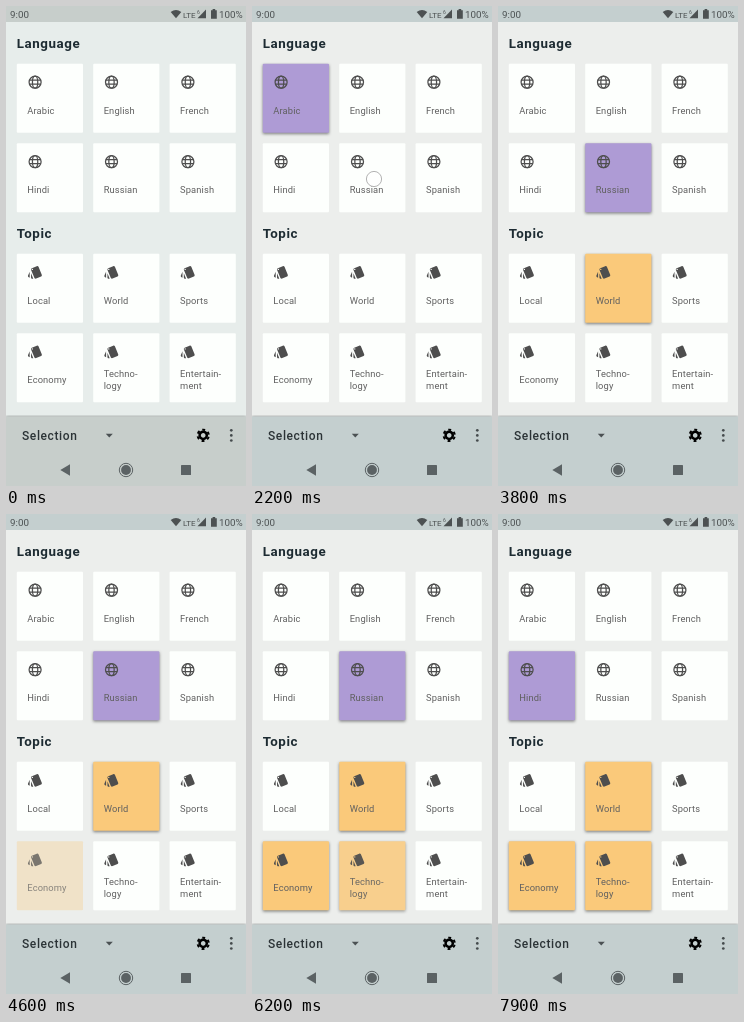
An HTML page that plays this animation: 240 by 480 pixels, repeating every 8 s.

```html
<!DOCTYPE html>
<html lang="en">
<head>
<meta charset="utf-8">
<title>Language and topic selection</title>
<style>
html, body { margin: 0; width: 100%; height: 100%; overflow: hidden; background: #eceeec; }
svg { display: block; width: 100vw; height: 100vh; }
text { font-family: Roboto, Inter, sans-serif; }
.title { font-size: 13.33px; font-weight: 700; letter-spacing: .6px; fill: #1d2b32; }
.label { font-size: 9.33px; letter-spacing: .12px; fill: #606060; }
.status { font-size: 9.8px; fill: #4c5152; }
.line { fill: none; stroke: #4e4e4e; stroke-width: 1.9; }
</style>
</head>
<body>
<svg viewBox="0 0 240 480">
  <defs>
    <filter id="blur" x="-20%" y="-20%" width="140%" height="140%"><feGaussianBlur stdDeviation="1.5"/></filter>
    <g id="globe" class="line">
      <circle r="9"/><ellipse rx="4" ry="9"/><path d="M-8.5-3H8.5M-8.5 3H8.5"/>
    </g>
    <path id="swatch" transform="translate(-12 -12)" fill="#4e4e4e" fill-rule="evenodd" d="M2.5 19.7l1.4.5v-9l-2.5 5.8c-.4 1 .1 2.2 1.1 2.7zM22 16L17.1 4c-.3-.8-1-1.2-1.8-1.2-.3 0-.6 0-.8.1L7.1 6c-.8.3-1.2 1-1.2 1.8 0 .2 0 .5.1.8l5 12c.3.7 1 1.2 1.8 1.2.3 0 .5-.1.8-.2l7.4-3c1-.5 1.4-1.6 1-2.6zM7.9 8.8a1 1 0 1 1 0-2 1 1 0 0 1 0 2zM5.9 19.8c0 1.1.9 2 2 2h1.4l-3.4-8.4z"/>
  </defs>
  <rect id="page" width="240" height="480"/>
  <text class="title" x="10.7" y="41.5">Language</text>
  <text class="title" x="10.7" y="231.5">Topic</text>
  <g id="cards"></g>

  <rect y="410.5" width="240" height="5" fill="#0006" filter="url(#blur)"/>
  <rect class="bar" width="240" height="16"/>
  <rect class="bar" y="410.5" width="240" height="69.5"/>

  <g class="status">
    <text x="4" y="12">9:00</text>
    <path d="M164.7 6Q170 1.8 175.3 6L170 12.2z"/>
    <text x="177" y="12" font-size="8" style="font-size:8px">LTE</text>
    <text x="191" y="7.5" style="font-size:5px">6</text>
    <path d="M191.5 12.2H200V3.5z"/>
    <path d="M205 4.2h1.6V3h2.6v1.2h1.6v8.6H205z"/>
    <text x="213" y="12">100%</text>
  </g>

  <text x="16" y="433.5" font-size="12" font-weight="500" letter-spacing=".6" fill="#2b3336">Selection</text>
  <path d="M99.8 427.7h7l-3.5 3.7z" fill="#4b5153"/>
  <g transform="translate(197.2 429.3) scale(.667)" fill="none" stroke="#000">
    <circle r="5.4" stroke-width="3.8"/>
    <circle r="8.4" stroke-width="3" pathLength="12" stroke-dasharray="1 1" stroke-dashoffset="-.5"/>
  </g>
  <g fill="#454b4d">
    <circle cx="225.3" cy="424.3" r="1.35"/><circle cx="225.3" cy="429.4" r="1.35"/><circle cx="225.3" cy="434.5" r="1.35"/>
  </g>
  <g fill="#5b6264">
    <path d="M54.3 464l9.7-5.8v11.6z"/>
    <circle cx="120" cy="464" r="4.9"/>
    <circle cx="120" cy="464" r="6.7" fill="none" stroke="#5b6264"/>
    <rect x="175" y="459" width="10" height="10" rx=".6"/>
  </g>
  <circle id="touch" r="7.6" fill="#fff" fill-opacity=".5" stroke="#b3b3b3"/>
</svg>
<script>
const LOOP = 8000, WHITE = [253, 255, 253], PURPLE = [174, 155, 213], ORANGE = [250, 201, 122];
const labels = ['Arabic', 'English', 'French', 'Hindi', 'Russian', 'Spanish',
  'Local', 'World', 'Sports', 'Economy', 'Techno-|logy', 'Entertain-|ment'];
const rowTop = [57.7, 137.2, 247.7, 327.2];

// Each tap selects one card and may clear another.
const taps = [
  { at: 1000, end: 1500, on: 0, x: 45, y: 91 },
  { at: 2200, end: 2700, on: 4, off: 0, x: 122, y: 173 },
  { at: 3300, end: 3600, on: 7, x: 108, y: 288 },
  { at: 4400, end: 4900, on: 9, x: 49, y: 360 },
  { at: 5900, end: 6300, on: 10, x: 117, y: 360 },
  { at: 7500, end: 7900, on: 3, off: 4, x: 49, y: 169 }
];

const $ = id => document.getElementById(id);
const bars = document.querySelectorAll('.bar');
const rgb = c => `rgb(${c.map(Math.round)})`;
const mix = (a, b, p) => a.map((v, i) => v + (b[i] - v) * p);

$('cards').innerHTML = labels.map((label, i) => {
  const x = 10.8 + i % 3 * 76.4, y = rowTop[i / 3 | 0];
  const lines = label.split('|');
  const first = lines.length > 1 ? 44.3 : 50;
  const text = lines.map((s, n) => `<text class="label" x="10.5" y="${first + n * 11.6}">${s}</text>`).join('');
  return `<g transform="translate(${x} ${y})">
    <rect y="1.3" width="66.2" height="69" fill="#0007" filter="url(#blur)"/>
    <rect width="66.2" height="69" rx="1"/>
    <g><use href="#${i < 6 ? 'globe' : 'swatch'}" transform="translate(18.3 18.5) scale(.667)"/>${text}</g>
  </g>`;
}).join('');
const cards = [...$('cards').children].map(g => g.children);

function progress(tap, t) {
  const start = Math.max(tap.at, tap.end - 400);
  const x = Math.min(1, Math.max(0, (t - start) / (tap.end - start)));
  return 1 - (1 - x) ** 1.3;
}

function draw(t) {
  const page = t < 1000 ? [231, 237, 235] : [236, 238, 236];
  $('page').setAttribute('fill', rgb(page));
  bars.forEach(b => b.setAttribute('fill', t < 1000 ? '#c7cecb' : '#c4cfcf'));

  cards.forEach(([shadow, face, content], i) => {
    const tap = taps.filter(k => (k.on === i || k.off === i) && progress(k, t) > 0).pop();
    const p = tap ? progress(tap, t) : 1;
    const chosen = tap && tap.on === i;
    const color = !chosen ? WHITE : i < 6 ? PURPLE : ORANGE;
    face.setAttribute('fill', rgb(mix(page, color, p)));
    shadow.setAttribute('opacity', chosen ? Math.max(0, p * 1.5 - .5) : 0);
    content.setAttribute('opacity', .6 + .4 * p);
  });

  const press = taps.find(k => t >= k.at && t < k.end && progress(k, t) < .3);
  $('touch').setAttribute('visibility', press ? 'visible' : 'hidden');
  if (press) $('touch').setAttribute('transform', `translate(${press.x} ${press.y})`);
}

const begin = performance.now();
function tick() {
  // The screen updates ten times a second.
  draw(Math.floor((performance.now() - begin) % LOOP / 100) * 100);
  requestAnimationFrame(tick);
}
tick();
</script>
</body>
</html>
```
